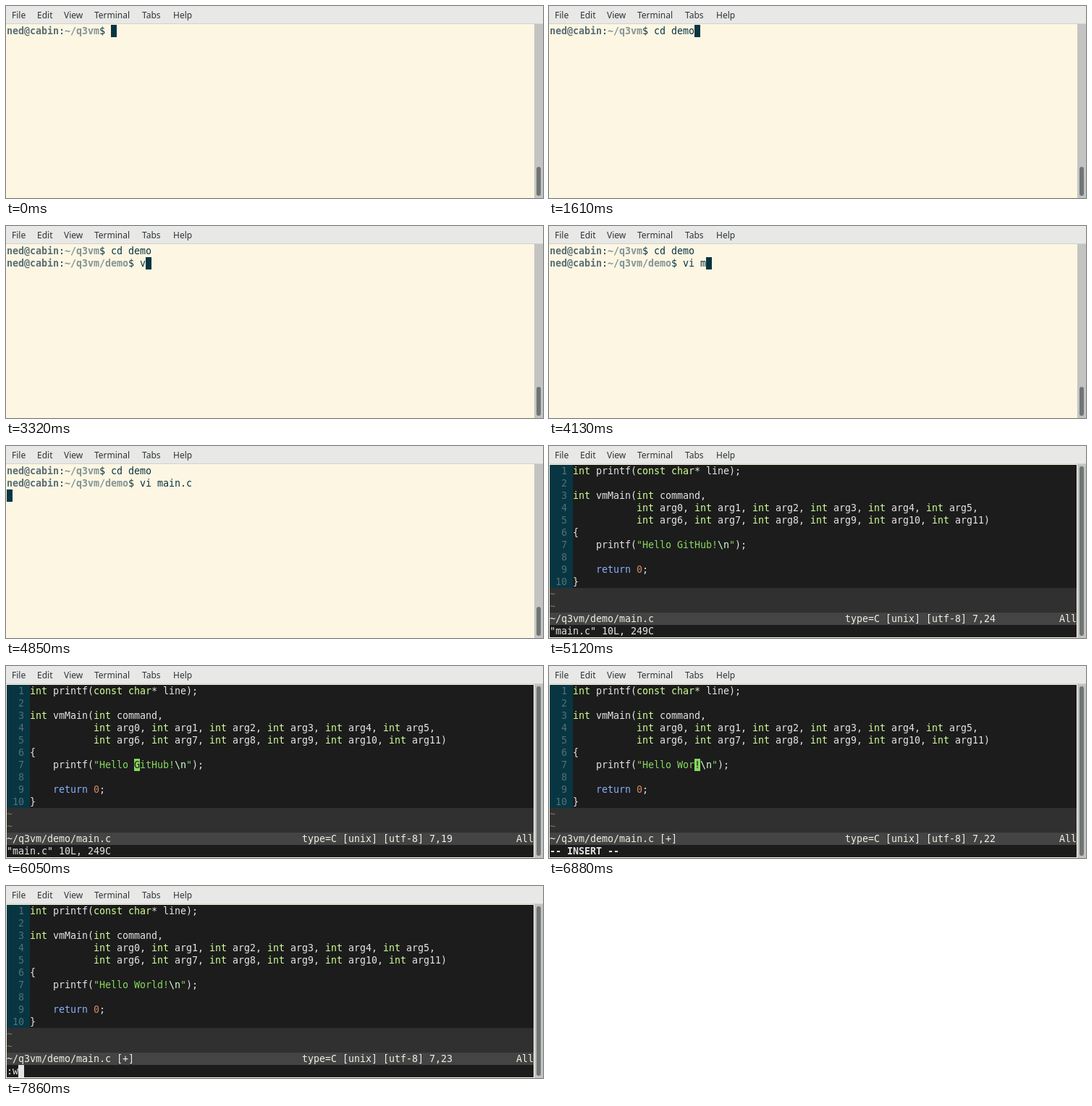
Write an HTML page that moves like this. It is 742 px wide and 265 px high and loops after 8000 ms.

```html
<!DOCTYPE html>
<html lang="en">
<head>
<meta charset="utf-8">
<title>Terminal</title>
<style>
html, body { margin: 0; width: 100%; height: 100%; overflow: hidden; background: #fdf6e3; }
#menu { position: absolute; inset: 0 0 auto; height: 24px; background: #e8e8e7; border-bottom: 1px solid #d2d2d0;
  font: 12px/17px "Noto Sans", "Open Sans", sans-serif; color: #2e3436; }
#menu span { position: absolute; top: 4px; }
#bar { position: absolute; left: 730px; top: 25px; width: 12px; height: 240px; background: #c3c4c2; }
#thumb { position: absolute; left: 3px; bottom: 3px; width: 6px; border-radius: 3px; background: #6f7675; }
#screen { position: absolute; left: 1px; top: 26px; width: 728px; height: 238px; overflow: hidden; color: #073642;
  font: 13.333px/17px "DejaVu Sans Mono", monospace; letter-spacing: calc(8px - 1ch);
  font-variant-ligatures: none; white-space: pre; }
#screen div { height: 17px; }
#screen.vim { background: #1c1c1c; color: #e4e4e4; }
#screen .cur { position: absolute; width: 8px; background: #073642; }
.vim .cur { background: #e4e4e4 !important; color: #1c1c1c; }
.vim .cur.on { background: #87d75f !important; }
.user { font-weight: bold; color: #586e75; }
.path { font-weight: bold; color: #839496; }
.num { display: inline-block; width: 32px; background: #073642; color: #586e75; }
.type { color: #cfff95; }
.str { color: #87d75f; }
.esc { color: #d7ffd7; }
.key { color: #87afff; }
.const { color: #d7875f; }
.fill { background: #303030; color: #767676; }
.status { background: #444; color: #f0f0e4; }
</style>
</head>
<body>
<div id="menu"></div>
<div id="screen"></div>
<div id="bar"><div id="thumb"></div></div>
<script>
const LOOP = 8000;
const screenEl = document.getElementById("screen");
const thumb = document.getElementById("thumb");

document.getElementById("menu").innerHTML =
  [["File", 8], ["Edit", 43], ["View", 80], ["Terminal", 122], ["Tabs", 188], ["Help", 231]]
    .map(([name, x]) => `<span style="left:${x}px">${name}</span>`).join("");

// Keystroke times of each typed text
const CD = [800, 990, 1100, 1210, 1400, 1470, 1610];
const VI = [3320, 3400, 3530, 4050, 4140, 4230, 4320, 4570, 4720];
const WORD = [6610, 6780, 6880, 7020, 7080];

const typed = (text, times, t) => text.slice(0, times.filter(k => t >= k).length);
const span = (cls, text) => `<span class="${cls}">${text}</span>`;
const row = (text, cls = "") => `<div class="${cls}">${text}</div>`;
const cursor = (col, line, char = "", cls = "") =>
  `<div class="cur ${cls}" style="left:${col * 8}px;top:${line * 17}px">${char}</div>`;
const prompt = path => span("user", "ned@cabin") + ":" + span("path", path) + "$ ";

function shell(t) {
  const cd = typed("cd demo", CD, t);
  const vi = typed("vi main.c", VI, t);
  let html = row(prompt("~/q3vm") + cd);
  if (t < 2110) return html + cursor(18 + cd.length, 0);
  html += row(prompt("~/q3vm/demo") + vi);
  return html + (t < 4850 ? cursor(23 + vi.length, 1) : cursor(0, 2));
}

const paint = line => line.replace(/"[^"]*"|\b(?:int|const|char)\b|\breturn\b|\b0\b/g, s =>
  s[0] == '"' ? span("str", s.replace("\\n", span("esc", "\\n"))) :
  s == "return" ? span("key", s) : s == "0" ? span("const", s) : span("type", s));

const args = from => " ".repeat(11) +
  Array.from({length: 6}, (_, i) => "int arg" + (from + i)).join(", ");

function vim(t) {
  const info = '"main.c" 10L, 249C';
  if (t < 5120) return row("") + row("▽") + row("").repeat(11) + row(info);

  const word = t < 6610 ? "GitHub" : typed("World", WORD, t);
  const call = `    printf("Hello ${word}!\\n");`;
  const code = ["int printf(const char* line);", "", "int vmMain(int command,",
    args(0) + ",", args(6) + ")", "{", call, "", "    return 0;", "}"];

  let col = t < 6050 ? 24 : t < 6610 ? 19 : 19 + word.length;
  const ruler = t < 7700 ? col : 23;
  if (t >= 7380) col = 23;

  const name = "~/q3vm/demo/main.c" + (t < 6610 ? "" : " [+]");
  const status = (name.padEnd(51) + "type=C [unix] [utf-8] 7," + ruler).padEnd(88) + "All";
  const command = t < 7860 ? ":" : ":w";
  const last = t < 6310 ? info : t < 7380 ? "<b>-- INSERT --</b>" : t < 7700 ? "" : command;

  let html = code.map((line, i) => row(span("num", String(i + 1).padStart(3)) + paint(line))).join("") +
    row("~", "fill").repeat(2) + row(status, "status") + row(last);
  if (t >= 7700) return html + cursor(command.length, 13);
  const hidden = t < 5220 || (t >= 6310 && t < 6610);
  return hidden ? html : html + cursor(col + 3, 6, call[col - 1], "on");
}

let shown;
function draw() {
  const t = performance.now() % LOOP;
  const editing = t >= 5020;
  const html = editing ? vim(t) : shell(t);
  if (html != shown) {
    screenEl.className = editing ? "vim" : "";
    screenEl.innerHTML = shown = html;
    thumb.style.height = editing ? "234px" : "40px";
  }
  requestAnimationFrame(draw);
}
draw();
</script>
</body>
</html>
```
